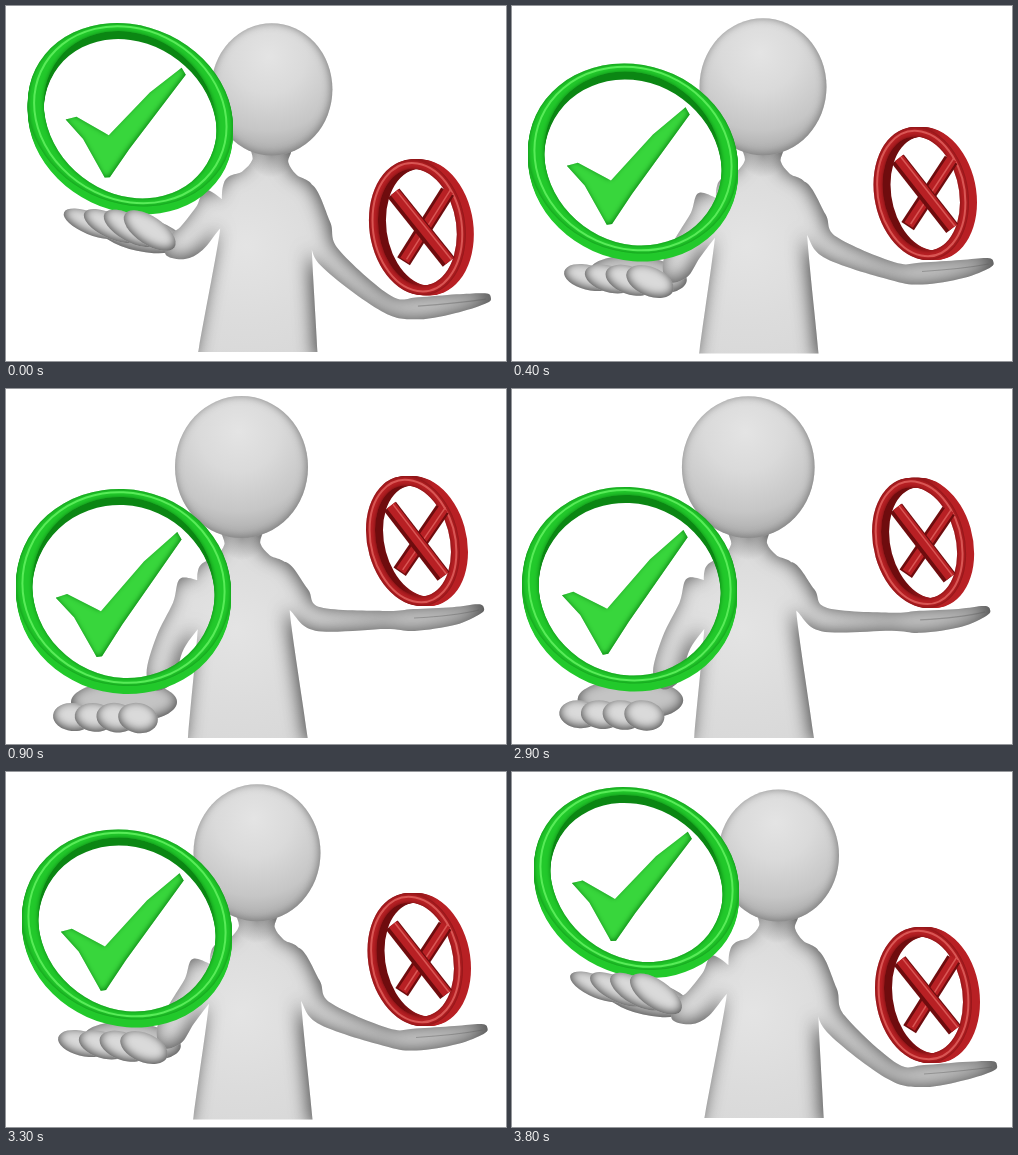
An HTML page with a canvas for the animation above (5800 ms loop, 500 px wide and 355 px high).

```html
<!DOCTYPE html>
<html lang="en">
<head>
<meta charset="utf-8">
<title>Weighing yes and no</title>
<style>
html, body { margin: 0; width: 100%; height: 100%; overflow: hidden; background: #fff; }
canvas { display: block; width: 500px; height: 355px; }
</style>
</head>
<body>
<canvas id="stage" width="500" height="355"></canvas>
<script>
const W = 500, H = 355, LOOP = 5800, STEP = 100, RETURN = 2900;
const ctx = document.getElementById('stage').getContext('2d');
const mask = document.createElement('canvas');
mask.width = W;
mask.height = H;
const maskCtx = mask.getContext('2d');

const green = { dark: '#0b8613', base: '#22c92b', light: '#58ec58' };
const red = { dark: '#6f0c0e', base: '#b82024', light: '#d95654' };

// Each pair holds the pose with the check raised and the pose with it lowered.
// Joints are x, y, radius.
const leftArm = [
  [[216, 196, 19], [194, 196, 19]],
  [[203, 211, 16], [183, 222, 18]],
  [[186, 232, 16], [164, 254, 15]],
  [[172, 240, 14], [154, 288, 14]]
];
const rightArm = [
  [[290, 188, 18], [266, 186, 18]],
  [[313, 222, 13], [292, 210, 14]],
  [[324, 252, 12], [312, 230, 12]],
  [[380, 299, 9], [380, 231, 9]],
  [[412, 304, 11], [408, 231, 11]],
  [[452, 299, 9], [448, 227, 9]],
  [[480, 294, 5], [473, 220, 5]]
];
// Height and half width down the torso.
const torso = [[140, 18], [155, 18], [167, 27], [180, 45], [230, 46], [346, 59.5], [400, 64]];

// Ovals are x, y, x radius, y radius, angle.
const head = [[266.5, 83.5, 60.5, 66, 0], [235.5, 78, 66.5, 71, 0]];
const palm = [[135, 226, 44, 17, 0.22], [118, 313, 53, 21, 0]];
const firstFinger = [[86, 215, 30, 11, 0.4], [67, 328, 20, 14, 0.1]];
const lastFinger = [[144, 222, 30, 14, 0.6], [132, 329, 20, 15, 0.2]];

// Rings are x, y, half width, half height, slant.
const greenRing = [[124.5, 110.5, 102.5, 95.5, 12], [117.5, 202.5, 107.5, 102.5, 4]];
const redRing = [[415.5, 223, 52.5, 68, 7], [411, 152, 51, 65, 11]];

// Marks live in the unit space of their ring.
const check = [
  [-0.63, 0.085], [-0.46, 0.27], [-0.25, 0.65], [-0.2, 0.64], [-0.01, 0.32],
  [0.54, -0.53], [0.5, -0.6], [0.19, -0.3], [-0.21, 0.2], [-0.525, 0.045]
];
const cross = [[[0.5, -0.58], [-0.34, 0.54]], [[-0.53, -0.45], [0.52, 0.46]]];

const lerp = (a, b, p) => a.map((v, i) => v + (b[i] - v) * p);
const pose = ([a, b], p) => lerp(a, b, p);

function smooth(pts) {
  const path = new Path2D(), n = pts.length;
  const at = i => pts[(i + n) % n];
  path.moveTo(...pts[0]);
  for (let i = 0; i < n; i++) {
    const [a, b, c, d] = [at(i - 1), at(i), at(i + 1), at(i + 2)];
    path.bezierCurveTo(b[0] + (c[0] - a[0]) / 6, b[1] + (c[1] - a[1]) / 6,
      c[0] - (d[0] - b[0]) / 6, c[1] - (d[1] - b[1]) / 6, c[0], c[1]);
  }
  path.closePath();
  return path;
}

// Rounded outline around a run of joints.
function chain(joints) {
  const left = [], right = [], last = joints.length - 1;
  joints.forEach(([x, y, r], i) => {
    const a = joints[Math.max(i - 1, 0)], b = joints[Math.min(i + 1, last)];
    const d = Math.hypot(b[0] - a[0], b[1] - a[1]);
    const tx = (b[0] - a[0]) / d * r, ty = (b[1] - a[1]) / d * r;
    left.push([x + ty, y - tx]);
    right.unshift([x - ty, y + tx]);
    if (i === last) left.push([x + tx, y + ty]);
  });
  return smooth([...left, ...right]);
}

function oval([x, y, rx, ry, angle]) {
  const path = new Path2D();
  path.ellipse(x, y, rx, ry, angle, 0, Math.PI * 2);
  return path;
}

const unitMatrix = ([x, y, w, h, s]) => new DOMMatrix([w, s, 0, Math.sqrt(h * h - s * s), x, y]);

function inRing(o, shape) {
  const path = new Path2D();
  path.addPath(shape, unitMatrix(o));
  return path;
}

function segments(pts) {
  const path = new Path2D();
  pts.forEach(([x, y]) => path.lineTo(x, y));
  return path;
}

function gradient(g, colors) {
  colors.forEach((c, i) => g.addColorStop(i / (colors.length - 1), c));
  return g;
}
const glow = (x, y, r, ...colors) => gradient(ctx.createRadialGradient(x, y, 0, x, y, r), colors);
const sweep = (x0, y0, x1, y1, ...colors) => gradient(ctx.createLinearGradient(x0, y0, x1, y1), colors);

// Fill, then let a shadow fall inwards from everything outside the shape.
function solid(path, fill, rim, blur, dx = 0, dy = 0, rule = 'nonzero') {
  maskCtx.globalCompositeOperation = 'source-over';
  maskCtx.fillRect(0, 0, W, H);
  maskCtx.globalCompositeOperation = 'destination-out';
  maskCtx.fill(path, rule);

  ctx.fillStyle = fill;
  ctx.fill(path, rule);
  ctx.save();
  ctx.clip(path, rule);
  ctx.shadowColor = rim;
  ctx.shadowBlur = blur;
  ctx.shadowOffsetX = 2 * W + dx;
  ctx.shadowOffsetY = dy;
  ctx.drawImage(mask, -2 * W, 0);
  ctx.restore();
}

function line(path, color, width) {
  ctx.strokeStyle = color;
  ctx.lineWidth = width;
  ctx.stroke(path);
}

const circle = oval([0, 0, 1, 1, 0]);

// An extruded hoop whose front face lies along the depth vector.
function ring([x, y, w, h, s], [bx, by], [dx, dy], pal) {
  const edge = (k, inset) => inRing(
    [x + dx * k, y + dy * k, w - Math.abs(dx) - bx * inset, h - Math.abs(dy) - by * inset, s], circle);
  const hoop = k => {
    const path = edge(k, 0);
    path.addPath(edge(k, 1));
    return path;
  };
  const ex = Math.sign(dx) * w, ey = Math.sign(dy) * h;
  ctx.fillStyle = sweep(x + ex, y + ey, x - ex, y - ey, pal.dark, pal.dark, pal.base, pal.base);
  for (let k = -1; k < 1; k += 0.25) ctx.fill(hoop(k), 'evenodd');
  solid(hoop(1), pal.base, pal.dark, 4, 0, 0, 'evenodd');
  line(edge(1, 0.4), pal.light, 2);
}

function drawFigure(p) {
  const [hx, hy, , hr] = pose(head, p);
  solid(oval(pose(palm, p)), '#c4c4c4', '#444', 12, 0, -2);

  const [neck, base, floor] = lerp([266, 252.5, 346], [236, 241.5, 349], p);
  const spine = torso.map(([y, r]) => [neck + (base - neck) * (y - 140) / 206, y, r]);
  const limb = joints => joints.map(j => pose(j, p));
  const arm = limb(rightArm);
  const body = chain(spine);
  body.addPath(chain(limb(leftArm)));
  body.addPath(chain(arm));

  ctx.save();
  ctx.beginPath();
  ctx.rect(0, 0, W, floor);
  ctx.clip();
  solid(body, glow(base - 12, 240, 150, '#e4e4e4', '#dcdcdc', '#d6d6d6'), '#4a4a4a', 18, -3, -1);
  ctx.clip(body);
  ctx.fillStyle = glow(neck, hy + hr, 22, 'rgba(80,80,80,.4)', 'rgba(80,80,80,0)');
  ctx.fillRect(neck - 30, hy + hr - 22, 60, 44);
  ctx.restore();

  const [a, b, c] = arm.slice(-3);
  const crease = new Path2D();
  crease.moveTo(a[0], a[1] - 2);
  crease.quadraticCurveTo(b[0], b[1], c[0], c[1] + 1);
  line(crease, 'rgba(90,90,90,.4)', 1.2);

  solid(oval(pose(head, p)),
    glow(hx - 3, hy - hr / 2, hr * 1.7, '#e4e4e4', '#dadada', '#c6c6c6', '#9a9a9a'), '#777', 9, -1, -1);
}

function drawCross(p) {
  const o = pose(redRing, p);
  ring(o, [9, 9.5], [-4, 0], red);
  for (const ends of cross) {
    const bar = inRing(o, segments(ends));
    line(bar, red.dark, 15);
    ctx.save();
    ctx.translate(1, -1);
    line(bar, red.base, 10);
    ctx.translate(2, -1);
    line(bar, red.light, 1.5);
    ctx.restore();
  }
}

function drawCheck(p) {
  const o = pose(greenRing, p);
  ring(o, [16, 8], [0, -4], green);
  solid(inRing(o, segments(check)), '#38d63c', green.dark, 5, -1, -1);
}

function drawFingers(p) {
  const first = pose(firstFinger, p), last = pose(lastFinger, p);
  for (let i = 0; i < 4; i++) {
    solid(oval(lerp(first, last, i / 3)), '#dadada', '#444', 10, 0, -2);
  }
}

function progress(t) {
  const back = t >= RETURN;
  const step = Math.floor((back ? t - RETURN : t) / STEP) + 1;
  const eased = (1 - Math.cos(Math.PI * Math.min(step / 10, 1))) / 2;
  return back ? 1 - eased : eased;
}

function draw(p) {
  ctx.fillStyle = '#fff';
  ctx.fillRect(0, 0, W, H);
  drawFigure(p);
  drawCross(p);
  drawCheck(p);
  drawFingers(p);
}

const start = performance.now();
let shown = -1;
function tick() {
  const p = progress((performance.now() - start) % LOOP);
  if (p !== shown) draw(shown = p);
  requestAnimationFrame(tick);
}
tick();
</script>
</body>
</html>
```
